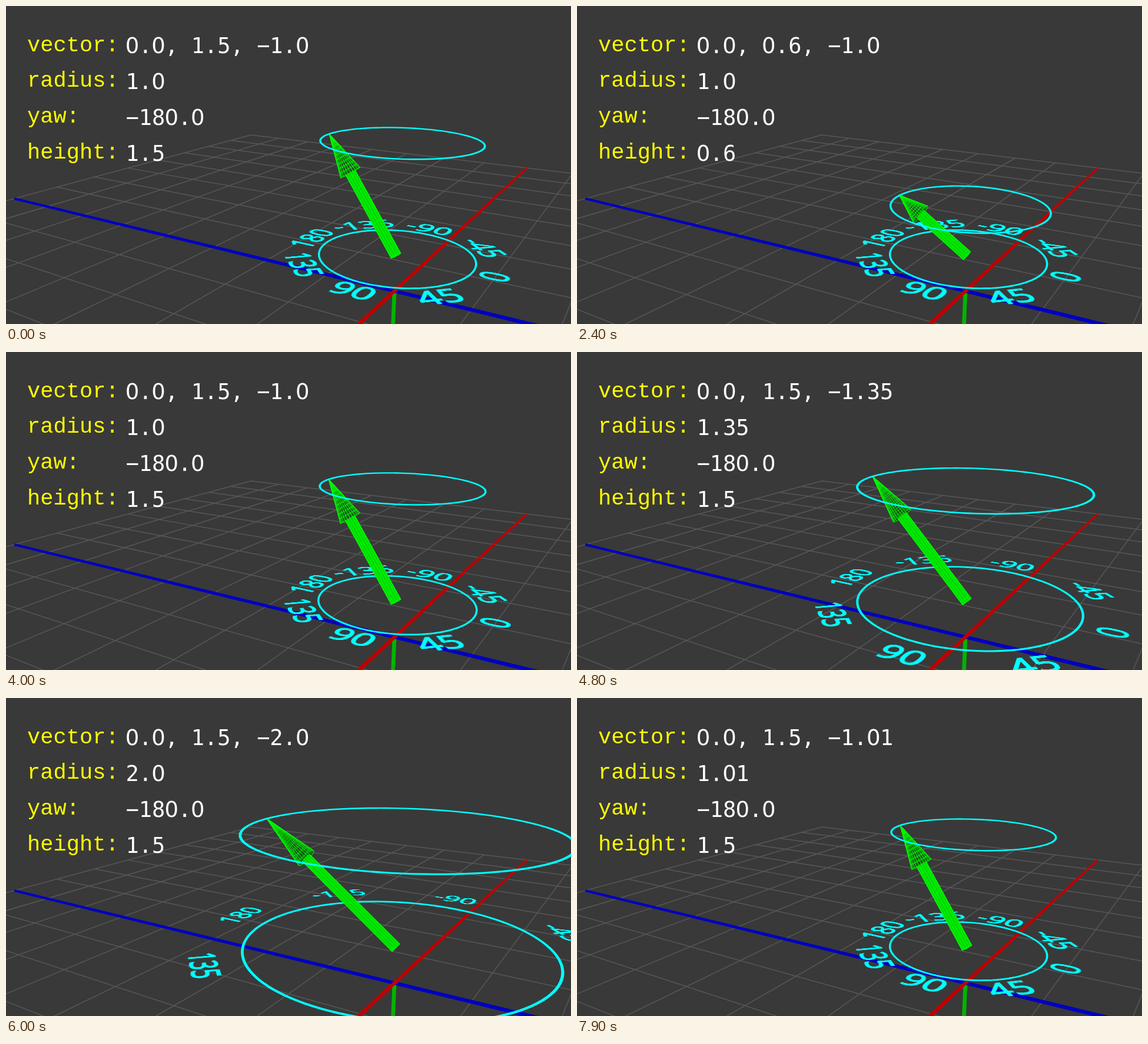
These frames come from a looping animation (960x540 px, 8000 ms). An HTML page with a canvas:

```html
<!DOCTYPE html>
<html lang="en">
<head>
<meta charset="utf-8">
<title>Cylindrical coordinates</title>
<style>
html, body { margin: 0; width: 100%; height: 100%; overflow: hidden; background: #393939; }
#stage { position: relative; width: 960px; height: 540px; overflow: hidden; }
canvas { position: absolute; left: 0; top: 0; }
.mark {
  position: absolute; left: 0; top: 0; white-space: nowrap; color: #0ff;
  font: 64px/1 "Open Sans", "Noto Sans", sans-serif; transform-origin: 0 0;
  -webkit-text-stroke: 2.5px #0ff;
}
</style>
</head>
<body>
<div id="stage"></div>
<script>
const W = 960, H = 540, LOOP = 8000, STEP = 100;
const HALF = 8;      // grid half size
const BASE = 0.489;  // dial height above the grid
const TAU = Math.PI * 2;
const stage = document.getElementById('stage');

function layer() {
  const c = document.createElement('canvas');
  c.width = W;
  c.height = H;
  stage.appendChild(c);
  return c.getContext('2d');
}

const back = layer();
const marks = [0, 45, 90, 135, 180, -135, -90, -45].map(yaw => {
  const el = document.createElement('div');
  el.className = 'mark';
  el.textContent = yaw;
  stage.appendChild(el);
  return { el, yaw };
});
const front = layer();

// Camera: homogeneous pixel vectors of the origin and the three axes
const CO = [660, 484, 1];
const CX = [-118.41, -1.9325, -0.10203];
const CY = [-13.72, -134.76, -0.02858];
const CZ = [79.85, -1.3, -0.064];

const dir = (x, y, z) => [0, 1, 2].map(i => x * CX[i] + y * CY[i] + z * CZ[i]);
const hom = (x, y, z) => dir(x, y, z).map((v, i) => v + CO[i]);
const flat = p => [p[0] / p[2], p[1] / p[2], p[2]];
const proj = (x, y, z) => flat(hom(x, y, z));

function clip(a, b, near = 0.12) {
  if (a[2] < near && b[2] < near) return null;
  const cut = (p, q) => {
    const k = (near - p[2]) / (q[2] - p[2]);
    return p.map((v, i) => v + (q[i] - v) * k);
  };
  return [a[2] < near ? cut(a, b) : a, b[2] < near ? cut(b, a) : b].map(flat);
}

function trace(g, pts, close) {
  pts.forEach((p, i) => i ? g.lineTo(p[0], p[1]) : g.moveTo(p[0], p[1]));
  if (close) g.closePath();
}

function axis(a, b, width, color) {
  const [p, q] = clip(hom(...a), hom(...b));
  const len = Math.hypot(q[0] - p[0], q[1] - p[1]);
  const nx = -(q[1] - p[1]) / len, ny = (q[0] - p[0]) / len;
  const side = (e, s) => [e[0] + s * nx * width / e[2] / 2, e[1] + s * ny * width / e[2] / 2];
  back.fillStyle = color;
  back.beginPath();
  trace(back, [side(p, 1), side(q, 1), side(q, -1), side(p, -1)], true);
  back.fill();
}

function drawFloor() {
  back.fillStyle = '#393939';
  back.fillRect(0, 0, W, H);
  back.strokeStyle = '#575757';
  back.lineWidth = 1.5;
  back.beginPath();
  for (let k = -HALF; k <= HALF; k++) {
    for (const [a, b] of [[[k, 0, -HALF], [k, 0, HALF]], [[-HALF, 0, k], [HALF, 0, k]]]) {
      const seg = clip(hom(...a), hom(...b));
      if (seg) trace(back, seg);
    }
  }
  back.stroke();
  axis([0, 0, 0], [0, -2, 0], 6.8, '#00b400');
  axis([0, 0, -HALF], [0, 0, HALF], 6, '#0000c0');
  axis([-HALF, 0, 0], [HALF, 0, 0], 6, '#c00000');
}

function drawCircle(g, radius, y) {
  const r = radius * 0.987;
  const ring = k => Array.from({ length: 128 }, (_, i) => {
    const a = i / 128 * TAU;
    return proj(r * k * Math.sin(a), y, r * k * Math.cos(a));
  });
  g.fillStyle = g.strokeStyle = '#0ff';
  g.lineWidth = 2.1;
  g.beginPath();
  trace(g, ring(1.005), true);
  trace(g, ring(0.995), true);
  g.fill('evenodd');
  g.stroke();
}

function placeMarks(r) {
  const em = 0.45 / 64;
  for (const { el, yaw } of marks) {
    const a = yaw * Math.PI / 180, s = Math.sin(a), c = Math.cos(a);
    // letters stand with their tops outward on the far half of the dial
    const flip = yaw > 0 && yaw < 180 ? 1 : -1;
    const u = dir(-c * flip * em, 0, s * flip * em);
    const v = dir(s * flip * em, 0, c * flip * em);
    const o = hom(s * 1.235 * r, BASE, c * 1.235 * r);
    const m = [u[0], u[1], 0, u[2], v[0], v[1], 0, v[2], 0, 0, 1, 0, o[0], o[1], 0, o[2]];
    el.style.transform = `matrix3d(${m.map(n => n.toFixed(8)).join()}) translate(-50%, -53%)`;
  }
}

function drawArrow(r, h) {
  const g = front, len = Math.hypot(r, h), neck = 0.675, n = 24;
  const ring = (s, rad) => Array.from({ length: n }, (_, i) => {
    const a = i / n * TAU, p = rad * Math.cos(a), q = rad * Math.sin(a) / len;
    return proj(p, BASE + s * h + q * r, -s * r + q * h);
  });
  const solid = (a, b, fill) => {
    g.fillStyle = fill;
    for (let i = 0; i < n; i++) {
      const j = (i + 1) % n;
      g.beginPath();
      trace(g, [a[i], a[j], b[j], b[i]], true);
      g.fill();
    }
    g.beginPath();
    trace(g, a, true);
    g.fill();
  };
  const wires = (a, b, every) => {
    g.beginPath();
    for (let i = 0; i < n; i += every) trace(g, [a[i], b[i]]);
    trace(g, a, true);
    g.stroke();
  };
  g.strokeStyle = '#0f0';
  g.lineWidth = 0.8;

  const brim = ring(neck, 0.145), tip = ring(1, 0);
  solid(brim, tip, '#1c4a1c');
  wires(brim, tip, 1);
  g.beginPath();
  for (let k = 1; k < 10; k++) trace(g, ring(neck + (1 - neck) * k / 10, 0.145 * (1 - k / 10)), true);
  g.stroke();

  const foot = ring(0, 0.071), top = ring(neck, 0.071);
  solid(foot, top, '#00dc00');
  wires(foot, top, 2);
}

const PITCH = 22.25;
const SANS = '37px "DejaVu Sans", sans-serif';
const MONO = '37px "DejaVu Sans Mono", monospace';
const SLAB = '37px "Liberation Mono", monospace';

function write(text, x, y, color, face) {
  front.fillStyle = color;
  front.textAlign = 'center';
  [...text].forEach((ch, i) => {
    front.font = ch === '0' ? SANS : face; // the sans zero has no inner dot
    front.fillText(ch, x + (i + 0.5) * PITCH, y);
  });
}

function show(v) {
  const s = String(+v.toFixed(2));
  return s.includes('.') ? s : s + '.0';
}

const ease = u => u * u * (3 - 2 * u);
const bump = t => t <= 0 || t >= 4000 ? 0 : ease(1 - Math.abs(t - 2000) / 2000);

function pose(t) {
  t %= LOOP;
  return { h: 1.5 - bump(t), r: 1 + bump(t - 4000) };
}

function draw(t) {
  const now = pose(t);             // values in the text
  const { h, r } = pose(t + STEP); // the scene runs one step ahead
  drawFloor();
  drawCircle(back, r, BASE);
  placeMarks(r);
  front.clearRect(0, 0, W, H);
  drawArrow(r, h);
  drawCircle(front, r, BASE + h);
  const rows = [
    ['vector:', `0.0, ${show(now.h)}, −${show(now.r)}`],
    ['radius:', show(now.r)],
    ['yaw:', '−180.0'],
    ['height:', show(now.h)]
  ];
  rows.forEach(([name, value], i) => {
    write(name, 36, 76.5 + i * 60.8, '#ff0', SLAB);
    write(value, 203.5, 80 + i * 61, '#fff', MONO);
  });
}

let last = -1;
function tick() {
  const step = Math.floor((performance.now() + 4) % LOOP / STEP);
  if (step !== last) draw((last = step) * STEP);
  requestAnimationFrame(tick);
}
tick();
</script>
</body>
</html>
```
